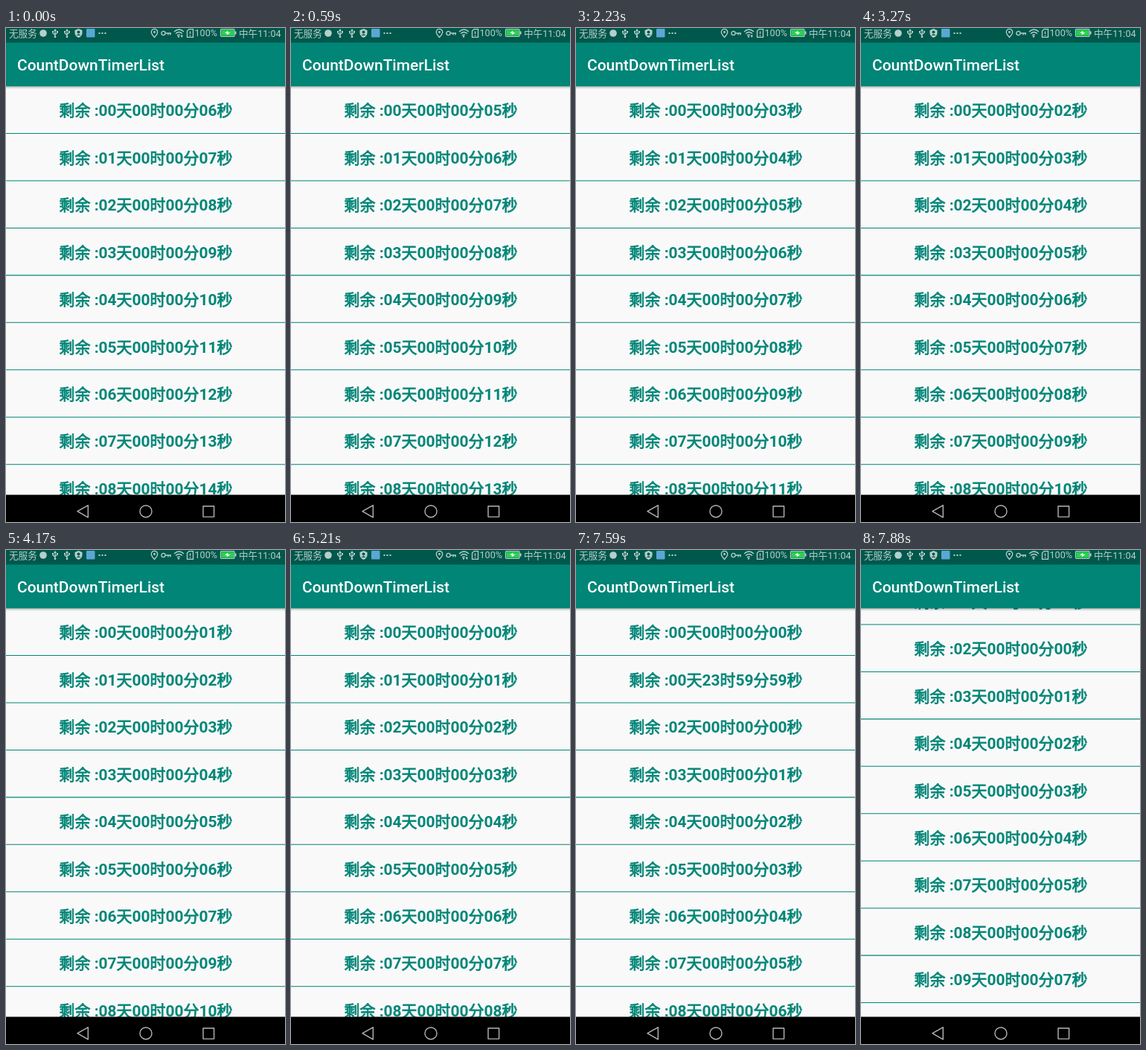
Animation of 375x663 px, one loop 8000 ms. Source, as an HTML page:

```html
<!DOCTYPE html>
<html lang="zh-CN">
<head>
<meta charset="utf-8">
<title>CountDownTimerList</title>
<style>
  html, body { margin: 0; width: 100%; height: 100%; overflow: hidden; background: #f9f9f9; }
  svg { display: block; width: 375px; height: 663px; }
  text { font-family: Roboto, "Noto Sans CJK SC", "Noto Sans CJK", sans-serif; }
  .row text { font-size: 20.95px; font-weight: 700; fill: #008577; text-anchor: middle; }
  .row path { stroke: #008577; stroke-width: 1.05; }
  /* Regular glyphs thickened by an outline, like synthetic bold */
  .han { font-weight: 400; stroke: #008577; stroke-width: .8; }
  .title { font-size: 20.95px; font-weight: 500; fill: #fff; }
  .status text { font-size: 12.6px; }
  .status { fill: #b6cfcb; }
  .line { fill: none; stroke: #b6cfcb; stroke-width: 1.3; }
  .nav { fill: none; stroke: #b4b4b4; stroke-width: 1.4; stroke-linejoin: round; }

  /* The list jumps up at the end of the loop */
  #list { animation: jump 8s step-end infinite; }
  @keyframes jump { 98.5% { transform: translateY(-105px); } }

  #traffic { animation: blink 8s step-end infinite; }
  @keyframes blink {
    0%, 18.5%, 55.75% { opacity: 1; }
    7.375%, 31.5%, 94.875% { opacity: 0; }
  }
</style>
</head>
<body>
<svg viewBox="0 0 375 663">
  <defs>
    <linearGradient id="shade" x2="0" y2="1">
      <stop stop-color="#000" stop-opacity=".26"/>
      <stop offset="1" stop-color="#000" stop-opacity="0"/>
    </linearGradient>
    <g id="usb">
      <path class="line" d="M0 3V12M-3 5V7L0 9.5M3 4.5V6.5L0 8.5"/>
      <path d="M0 1L2 4H-2ZM-4 4H-2V6H-4ZM2 4H4V6H2Z"/>
      <circle cy="11.8" r="1.4"/>
    </g>
  </defs>

  <rect width="375" height="663" fill="#f9f9f9"/>
  <g id="list"></g>

  <rect y="78" width="375" height="4" fill="url(#shade)"/>
  <rect y="19" width="375" height="59.3" fill="#008577"/>
  <text class="title" x="15" y="57">CountDownTimerList</text>

  <rect width="375" height="19.5" fill="#00574b"/>
  <g class="status">
    <text x="4" y="12">无服务</text>
    <circle cx="50" cy="7" r="4.8"/>
    <use href="#usb" x="66"/>
    <use href="#usb" x="82"/>
    <path d="M97.500 1L102.500 3V7Q102 11 97.500 13Q93 11 92.500 7V3Z"/>
    <path d="M97.500 3.500A2 2 0 0 1 97.500 7.500A2 2 0 0 1 97.500 3.500M94.500 10Q97.500 6.500 100.500 10Z" fill="#00574b"/>
    <rect x="108" y="1" width="11.5" height="11.5" rx="1" fill="#5aa7d6"/>
    <path d="M124.500 6h2v2h-2zM128.500 6h2v2h-2zM132.500 6h2v2h-2z"/>

    <path class="line" d="M199.500 12.500Q195.300 8 195.300 5.500A4.200 4.200 0 0 1 203.700 5.500Q203.700 8 199.500 12.500Z"/>
    <circle cx="199.500" cy="5.500" r="1.400"/>
    <g class="line">
      <circle cx="211.500" cy="7" r="2.600"/>
      <path d="M214.500 7H222M218 7V9.500M221 7V9.500"/>
      <path d="M226 5Q232.500 -1 239 5M228 7.500Q232.500 3.500 237 7.500M230 10Q232.500 8 234 9.500"/>
      <path d="M246 1.600H251.500V12.400H243.500V4Z"/>
      <path d="M247.500 4.500V8M247.500 9.300V10.700"/>
    </g>
    <circle cx="232" cy="11.500" r="1.200"/>
    <path id="traffic" d="M235 9.500H237.500V11L236.250 13L235 11Z"/>

    <text x="253.500" y="11">100%</text>
    <rect class="line" x="288.500" y="1.700" width="18.500" height="9.600" rx="1"/>
    <rect x="289.500" y="2.600" width="16.500" height="7.800" fill="#27d34c"/>
    <path d="M307.500 4.500H309.500V8.500H307.500Z"/>
    <path d="M298.500 3.500L294 7H297.200L296.500 9.500L301.500 6H298Z" fill="#fff"/>
    <text x="313" y="12">中午11:04</text>
  </g>

  <rect y="626.5" width="375" height="36.5"/>
  <g class="nav">
    <path d="M96 648.700L110.300 640.600V656.800Z"/>
    <circle cx="188" cy="648.700" r="8"/>
    <rect x="265" y="641.800" width="14.600" height="14.300"/>
  </g>
</svg>

<script>
const LOOP = 8000, ROWS = 10, PITCH = 63.45, DAY = 86400;

// Each tick: time, then optionally the first row that lags and its later time
const ticks = [
  [150, 5, 300], [1190, 7, 1330], [2230], [3120, 5, 3270],
  [4170, 7, 4320], [5210], [6250], [7150, 5, 7290]
];

const list = document.getElementById('list');

function add(parent, tag, attrs) {
  const el = document.createElementNS('http://www.w3.org/2000/svg', tag);
  for (const key in attrs) el.setAttribute(key, attrs[key]);
  return parent.appendChild(el);
}

const labels = Array.from({ length: ROWS }, (_, i) => {
  const row = add(list, 'g', { class: 'row', transform: `translate(0 ${i * PITCH})` });
  add(row, 'path', { d: 'M0 141.5H375' });
  return add(row, 'text', { x: 188, y: 118.3 });
});

const pad = n => String(Math.floor(n)).padStart(2, '0');

function format(s) {
  return `剩余 :${pad(s / DAY)}天${pad(s / 3600 % 24)}时${pad(s / 60 % 60)}分${pad(s % 60)}秒`;
}

function secondsLeft(row, t) {
  const passed = ticks.filter(([at, split, late]) => t >= (row >= split ? late : at)).length;
  return Math.max(0, row * DAY + row + 6 - passed);
}

function draw(t) {
  labels.forEach((label, i) => {
    const str = format(secondsLeft(i, t));
    if (label.textContent !== str) {
      label.innerHTML = str.replace(/\p{Script=Han}+/gu, '<tspan class="han">$&</tspan>');
    }
  });
}

const start = performance.now();
function frame() {
  draw((performance.now() - start) % LOOP);
  requestAnimationFrame(frame);
}
frame();
</script>
</body>
</html>
```
